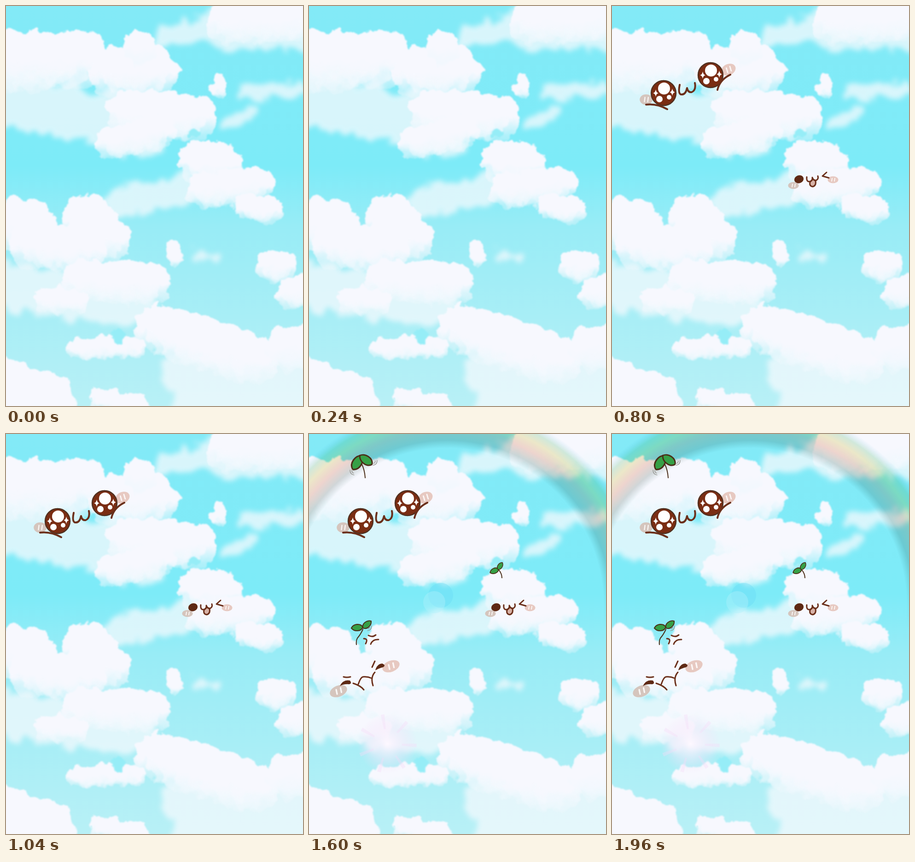
An HTML page for the animation above (2.2 s loop, 645x868 px).

```html
<!DOCTYPE html>
<html lang="en">
<head>
<meta charset="utf-8">
<title>Sky friends</title>
<style>
  html, body { margin: 0; width: 100%; height: 100%; overflow: hidden; background: #8eecf7; }
  svg { display: block; width: 100%; height: 100%; }
  .line, .thin, .stem { fill: none; stroke: #6b2f1a; stroke-width: 3; stroke-linecap: round; stroke-linejoin: round; }
  .bold { stroke-width: 4; }
  .thin { stroke: #8b8b84; stroke-width: 1.2; }
  .stem { stroke: #4a2d17; stroke-width: 2; }
  .dark { fill: #5e2914; }
  .left { fill: #d5c5bd; }
  .right { fill: #e7c9c1; }
</style>
</head>
<body>
<svg viewBox="0 0 645 868" preserveAspectRatio="none">
  <defs>
    <linearGradient id="sky" x2="0" y2="1">
      <stop offset="0" stop-color="#83eaf7"/>
      <stop offset=".4" stop-color="#7debf8"/>
      <stop offset=".55" stop-color="#98ecf6"/>
      <stop offset="1" stop-color="#b8f0f6"/>
    </linearGradient>
    <linearGradient id="puff" x2="0" y2="1">
      <stop offset=".5" stop-color="#f7f8fe"/>
      <stop offset="1" stop-color="#eef8fd" stop-opacity=".3"/>
    </linearGradient>
    <radialGradient id="arch" gradientUnits="userSpaceOnUse" cx="300" cy="370" r="435">
      <stop offset=".78" stop-color="#cfdcda" stop-opacity="0"/>
      <stop offset=".82" stop-color="#d3d8d5"/>
      <stop offset=".87" stop-color="#f5d6ca"/>
      <stop offset=".92" stop-color="#f3edc4"/>
      <stop offset=".96" stop-color="#d3eed8"/>
      <stop offset="1" stop-color="#d2ecfa" stop-opacity="0"/>
    </radialGradient>
    <linearGradient id="fade" x2="0" y2="1">
      <stop offset=".8" stop-color="#fff"/><stop offset="1"/>
    </linearGradient>
    <mask id="upper"><rect width="645" height="420" fill="url(#fade)"/></mask>
    <radialGradient id="glow">
      <stop offset="0" stop-color="#fdf8ff"/>
      <stop offset="1" stop-color="#f3dcf7" stop-opacity="0"/>
    </radialGradient>
    <filter id="fluffy" filterUnits="userSpaceOnUse" x="-40" y="-40" width="725" height="948" color-interpolation-filters="sRGB">
      <feTurbulence type="fractalNoise" baseFrequency=".04" numOctaves="4" seed="4"/>
      <feComponentTransfer result="noise"><feFuncA type="linear" slope="0" intercept="1"/></feComponentTransfer>
      <feDisplacementMap in="SourceGraphic" in2="noise" scale="26" xChannelSelector="R" yChannelSelector="G"/>
      <feGaussianBlur stdDeviation="1.8"/>
    </filter>
    <filter id="wispy" filterUnits="userSpaceOnUse" x="-40" y="-40" width="725" height="948" color-interpolation-filters="sRGB">
      <feTurbulence type="fractalNoise" baseFrequency=".03" numOctaves="4" seed="9"/>
      <feComponentTransfer result="noise"><feFuncA type="linear" slope="0" intercept="1"/></feComponentTransfer>
      <feDisplacementMap in="SourceGraphic" in2="noise" scale="45" xChannelSelector="R" yChannelSelector="G"/>
      <feGaussianBlur stdDeviation="6"/>
    </filter>
    <path id="star" fill="#fff" d="M0-8Q1-1 6 0Q1 1 0 8Q-1 1-6 0Q-1-1 0-8"/>
    <g id="sparkleEye">
      <circle r="27" fill="#7a2d13" stroke="#4f3020" stroke-width="2.4"/>
      <g fill="#fff">
        <circle cx="1" cy="-10" r="13"/><circle cx="-9" cy="13" r="7"/><circle cx="12" cy="9" r="5"/>
      </g>
      <use href="#star" x="-17"/><use href="#star" x="19" y="-2"/>
    </g>
    <g id="blush">
      <ellipse rx="11.5" ry="7.5"/>
      <path fill="none" stroke="#fff" stroke-opacity=".85" stroke-width="2" stroke-linecap="round" d="M-2-3L-3 3M4-3L3 3"/>
    </g>
    <path id="leaf" fill="#36a046" stroke="#4a2d17" stroke-width="2.6" d="M0 0C-12-6-10-24 0-30C10-24 12-6 0 0"/>
    <path id="sway" class="thin" d="M0 9Q9 8 9-2M1 5Q5 4 5-1"/>
  </defs>

  <rect width="645" height="868" fill="url(#sky)"/>
  <g id="haze" filter="url(#wispy)" fill="#f1f9fd" opacity=".78"/>
  <g id="clouds" filter="url(#fluffy)" fill="url(#puff)"/>
  <g filter="url(#fluffy)" fill="#96edf7">
    <ellipse cx="408" cy="277" rx="13" ry="9"/>
    <ellipse cx="243" cy="716" rx="17" ry="15"/>
  </g>

  <g data-from="4">
    <circle cx="300" cy="370" r="435" fill="url(#arch)" mask="url(#upper)" opacity=".9" style="mix-blend-mode:multiply"/>
    <circle cx="286" cy="350" r="27" fill="#65d8f4" opacity=".35"/>
    <circle cx="272" cy="365" r="24" fill="#b0effb" opacity=".4"/>
    <circle cx="170" cy="672" r="65" fill="url(#glow)"/>
    <circle cx="170" cy="672" r="48" fill="none" stroke="#f3d9f6" stroke-width="32" stroke-dasharray="6 37" opacity=".35"/>
  </g>

  <g data-from="1">
    <ellipse class="dark" cx="406" cy="376" rx="10.3" ry="8.6" transform="rotate(-20 406 376)"/>
    <use href="#blush" class="left" x="394" y="389.5"/>
    <use href="#blush" class="right" x="480" y="377"/>
    <path class="line" style="fill:#d8b2a7" d="M430 382Q428 391 436 392Q444 390 442 379L436 376Z"/>
    <path class="line" d="M423 371Q422 382 429 381Q436 380 435 372Q438 380 444 378Q449 375 447 369M466 361L457 369L471 373"/>
  </g>

  <g data-from="2">
    <use href="#blush" class="left" transform="translate(74 203) scale(1.2 1.5)"/>
    <use href="#blush" class="right" transform="translate(253 138) rotate(-25) scale(1.4 1.6)"/>
    <use href="#sparkleEye" x="112" y="189"/>
    <use href="#sparkleEye" x="214" y="150"/>
    <path class="line bold" d="M74 214Q97 211 120 224M229 182Q234 160 257 149M147 171Q143 190 150 192Q160 193 163 178Q165 188 173 187Q183 183 180 167"/>
  </g>

  <g data-from="3">
    <use href="#blush" class="left" transform="translate(64 558) rotate(-22) scale(1.7 1.6)"/>
    <use href="#blush" class="right" transform="translate(178 504) rotate(-22) scale(1.7 1.6)"/>
    <path class="dark" d="M67 547Q74 532 89 535Q94 542 87 543Q76 542 67 547M144 513Q147 499 159 498Q168 502 161 506Q152 508 144 513"/>
    <path class="line" d="M96 541Q112 546 119 555M107 543Q112 528 117 527Q127 526 136 530M143 517Q133 528 139 546M75 527Q82 529 90 527M143 493L137 506"/>
    <path class="line" d="M119 444Q129 444 123 455M129 437Q138 442 145 436M134 456Q138 445 151 446"/>
  </g>

  <g data-from="4">
    <path class="stem" d="M114 64Q121 78 122 95M411 293Q419 303 419 312M117 424Q112 435 105 443Q102 448 103 457"/>
    <use href="#leaf" transform="translate(95 77) rotate(33) scale(1.2)"/>
    <use href="#leaf" transform="translate(137 66) rotate(-54) scale(1.1)"/>
    <use href="#leaf" transform="translate(412 293) rotate(-113) scale(.68)"/>
    <use href="#leaf" transform="translate(410 294) rotate(34) scale(.6)"/>
    <use href="#leaf" transform="translate(117 419) rotate(-95) scale(.84)"/>
    <use href="#leaf" transform="translate(117 421) rotate(50) scale(.78)"/>
    <use href="#sway" x="139" y="59"/>
    <use href="#sway" x="127" y="418"/>
    <use href="#sway" transform="translate(98 80) scale(-1 1)"/>
  </g>
</svg>

<script>
let seed = 7;
const random = () => (seed = seed * 16807 % 2147483647) / 2147483647;

// A row of uneven puffs from one point to another
function ridge(x0, y0, x1, y1, size, layer = 'clouds') {
  const steps = Math.ceil(Math.hypot(x1 - x0, y1 - y0) / size / .6) || 1;
  for (let i = 0; i <= steps; i++) {
    const t = i / steps, radius = size * (.92 + .16 * random());
    const puff = document.createElementNS('http://www.w3.org/2000/svg', 'circle');
    puff.setAttribute('cx', x0 + (x1 - x0) * t);
    puff.setAttribute('cy', y0 + (y1 - y0) * t);
    puff.setAttribute('r', radius);
    document.getElementById(layer).append(puff);
  }
}
const haze = (...row) => ridge(...row, 'haze');

// Upper left
haze(0, 200, 290, 265, 60);
ridge(0, 118, 155, 118, 64);
ridge(240, 145, 318, 143, 57);
ridge(290, 88, 292, 92, 33);
ridge(265, 232, 408, 243, 50);
ridge(230, 297, 340, 272, 35);

// Upper right
haze(470, 45, 645, 40, 52);
ridge(480, 35, 645, 28, 50);
haze(340, 68, 420, 50, 20);
ridge(462, 167, 464, 184, 17);
haze(520, 185, 640, 182, 16);
haze(475, 255, 535, 228, 14);

// Middle
haze(250, 425, 410, 395, 32);
ridge(420, 340, 460, 345, 47);
ridge(430, 400, 550, 385, 38);
ridge(525, 437, 572, 444, 30);

// Left
haze(0, 610, 270, 645, 50);
ridge(5, 477, 50, 475, 55);
ridge(175, 463, 220, 508, 52);
ridge(60, 520, 170, 530, 50);
ridge(165, 595, 312, 603, 46);
ridge(90, 638, 150, 640, 28);

// Bottom
haze(390, 790, 645, 800, 50);
haze(400, 865, 645, 860, 40);
ridge(330, 700, 540, 768, 55);
ridge(155, 745, 280, 740, 23);
ridge(615, 745, 645, 738, 50);
ridge(0, 840, 75, 866, 72);
ridge(205, 852, 290, 870, 26);

// Small ones
ridge(575, 566, 603, 563, 33);
ridge(620, 623, 650, 620, 34);
ridge(365, 530, 367, 550, 16);
haze(410, 545, 455, 550, 11);

const LOOP = 2200, STEP = 400, LAST = 4;
const groups = document.querySelectorAll('[data-from]');
let shown = -1;

function draw() {
  const stage = Math.min(LAST, Math.floor(performance.now() % LOOP / STEP));
  if (stage !== shown) {
    shown = stage;
    for (const group of groups) group.style.display = stage >= group.dataset.from ? '' : 'none';
  }
  requestAnimationFrame(draw);
}
draw();
</script>
</body>
</html>
```
